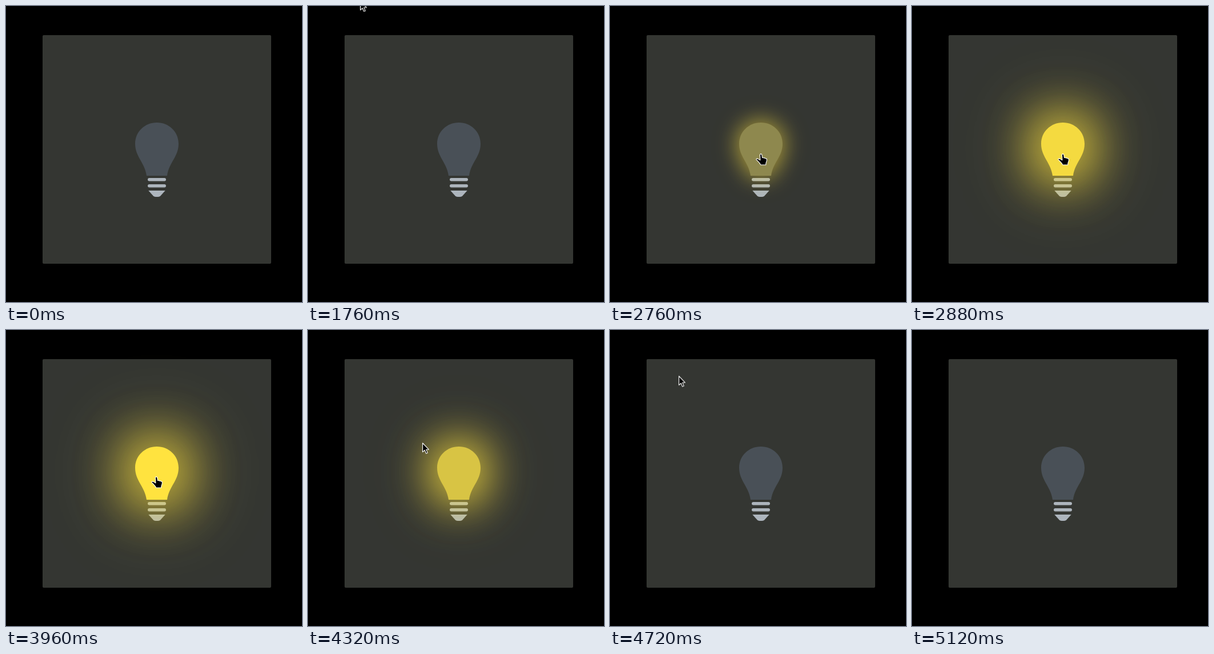
These frames come from a looping animation (518 by 518 pixels, 5.96 s). An HTML page:

```html
<!DOCTYPE html>
<html lang="en">
<head>
<meta charset="utf-8">
<title>Light bulb</title>
<style>
  :root {
    --loop: 5960ms;
    --off: #495057;
    --on: #ffe33f;
  }
  html, body {
    margin: 0;
    width: 100%;
    height: 100%;
    overflow: hidden;
    background: #000;
  }
  svg {
    position: absolute;
    left: 0;
    top: 0;
    width: 518px;
    height: 518px;
    overflow: visible;
  }
  .room { fill: #343632; }
  .base { fill: #adb5bd; }

  .glass {
    fill: var(--off);
    animation: light var(--loop) infinite;
  }
  .cursor {
    width: 24px;
    height: 24px;
    animation: move var(--loop) linear infinite;
  }
  .cursor path {
    stroke: #fff;
    stroke-width: 1.1;
    stroke-linejoin: round;
    opacity: 0;
  }
  .arrow { animation: arrow var(--loop) step-end infinite; }
  .hand { animation: hand var(--loop) step-end infinite; }

  /* Hover fades of 300 ms, at 2632 and 4225 ms */
  @keyframes light {
    0%, 44.161% {
      fill: var(--off);
      filter: drop-shadow(0 0 0 rgba(255, 227, 63, 0)) drop-shadow(0 0 0 rgba(255, 227, 63, 0));
      animation-timing-function: ease-in-out;
    }
    49.195%, 70.889% {
      fill: var(--on);
      filter: drop-shadow(0 0 50px rgba(255, 227, 63, 1)) drop-shadow(0 0 50px rgba(255, 227, 63, 1));
      animation-timing-function: ease-in-out;
    }
    75.923%, 100% {
      fill: var(--off);
      filter: drop-shadow(0 0 0 rgba(255, 227, 63, 0)) drop-shadow(0 0 0 rgba(255, 227, 63, 0));
    }
  }
  @keyframes move {
    0%, 29.53% { transform: translate(91px, -10px); }
    38.926% {
      transform: translate(157px, 200px);
      animation-timing-function: cubic-bezier(.3, .3, .6, .9);
    }
    45.638%, 66.442% { transform: translate(263px, 259px); }
    66.443%, 68.5% { transform: translate(262px, 257px); }
    70.889% { transform: translate(229px, 225px); }
    74.497% { transform: translate(164px, 162px); }
    78.523% { transform: translate(122px, 91px); }
    85.235%, 100% { transform: translate(103px, -19px); }
  }
  @keyframes arrow {
    0% { opacity: 0; }
    29.53% { opacity: 1; }
    44.161% { opacity: 0; }
    70.889% { opacity: 1; }
    85.9%, 100% { opacity: 0; }
  }
  @keyframes hand {
    0% { opacity: 0; }
    44.161% { opacity: 1; }
    70.889%, 100% { opacity: 0; }
  }
</style>
</head>
<body>
  <svg viewBox="0 0 518 518">
    <rect class="room" x="64" y="51" width="400" height="400" rx="2"/>
    <g class="base">
      <rect x="248" y="301" width="32" height="5.5" rx="2.75"/>
      <rect x="248" y="312" width="32" height="5.5" rx="2.75"/>
      <path d="M249.3 323H278.7L270.4 332.3Q268.8 334 266.3 334H261.7Q259.2 334 257.6 332.3Z"/>
    </g>
  </svg>

  <svg class="glass" viewBox="0 0 518 518">
    <path d="M264 204C285 204 302 220 302 241C302 264 285 274 282 297H246C243 274 226 264 226 241C226 220 243 204 264 204Z"/>
  </svg>

  <svg class="cursor" viewBox="0 0 24 24">
    <path class="arrow" d="M.6 1V16.6L4.2 13.3L6.7 19.2L9.3 18.1L6.8 12.3H11.5Z"/>
    <path class="hand" transform="translate(-8 -1)" d="M7.4 3C7.3 .3 10.4 .2 10.8 2.8L11.6 7.6C12.6 6.9 14 7.2 14.5 8.2C15.6 7.6 16.8 8 17.2 9C18.5 8.6 19.4 9.5 19.4 10.8C19.4 14 18.5 15 17.9 17L17.7 20H8.5C8 17.6 6.5 16.5 5 14.8C3.5 13 2 12 1.1 11C.4 9.5 2.4 8.6 4.2 9.6L7.9 11.8Z"/>
  </svg>
</body>
</html>
```
